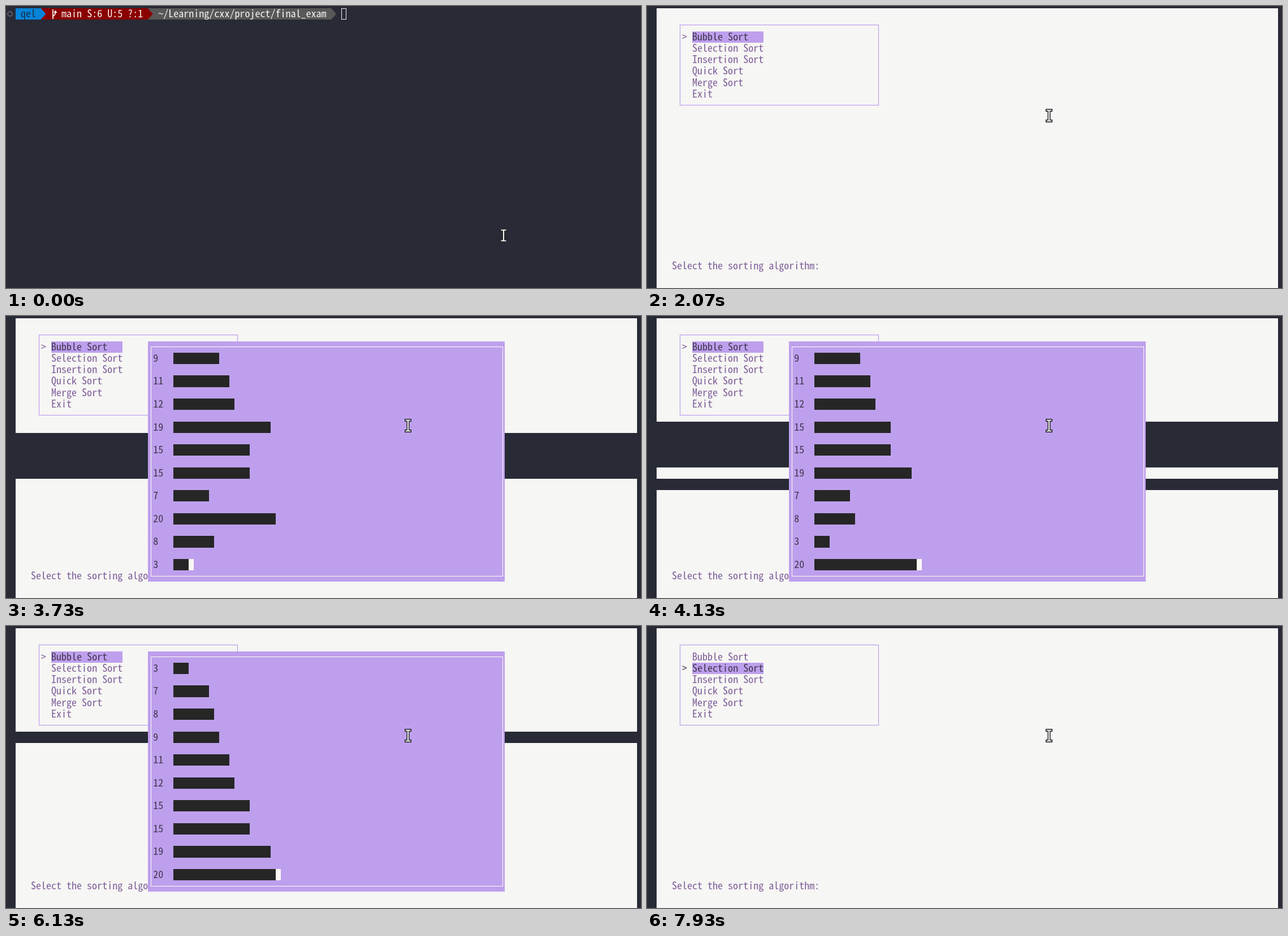
An HTML page with a canvas for the animation above (8 s loop, 1123 by 499 pixels).

```html
<!DOCTYPE html>
<html lang="en">
<head>
<meta charset="utf-8">
<title>Terminal sort visualizer</title>
<style>
html, body { margin: 0; width: 100%; height: 100%; overflow: hidden; background: #282a36; }
canvas { display: block; }
</style>
</head>
<body>
<canvas id="stage" width="1123" height="499"></canvas>
<script>
const ctx = document.getElementById("stage").getContext("2d");
const LOOP = 8000, COL = 9.01, ROW = 20.28, COLS = 122;
const DARK = "#282a36", PAPER = "#f6f6f4", LILAC = "#be9fed", INK = "#262626",
      MENU = "#7d5d98", LABEL = "#41374f", LIGHT = "#f5f4f1";
const ALGORITHMS = ["Bubble Sort", "Selection Sort", "Insertion Sort", "Quick Sort", "Merge Sort", "Exit"];
const FAMILY = '"Noto Sans Mono CJK JP", "Noto Sans Mono CJK SC", "Noto Sans Mono", monospace';

const colX = c => 17 + c * COL;
const rowY = r => 4 + r * ROW;

// Font size at which one character fills one column
function gridFont() {
  ctx.font = `100px ${FAMILY}`;
  return `${100 * COL / ctx.measureText("m").width}px ${FAMILY}`;
}

function box(x0, y0, x1, y1, color) {
  x0 = Math.round(x0); y0 = Math.round(y0);
  ctx.fillStyle = color;
  ctx.fillRect(x0, y0, Math.round(x1) - x0, Math.round(y1) - y0);
}

function cells(c, r, w, h, color) {
  box(colX(c), rowY(r), colX(c + w), rowY(r + h), color);
}

function text(str, c, r, color) {
  ctx.fillStyle = color;
  ctx.fillText(str, colX(c), rowY(r) + 16);
}

// Line border through the centres of the edge cells
function frame(c0, r0, c1, r1, color) {
  const x = Math.round(colX(c0 + 0.5)), y = Math.round(rowY(r0 + 0.5));
  ctx.strokeStyle = color;
  ctx.lineWidth = 1.2;
  ctx.strokeRect(x + 0.5, y - 0.5, Math.round((c1 - c0) * COL), Math.round((r1 - r0) * ROW));
}

// Every array state of the bubble sort, one per swap
function sortStates(list) {
  const a = list.slice(), states = [list];
  for (let end = a.length - 1; end > 0; end--)
    for (let i = 0; i < end; i++)
      if (a[i] > a[i + 1]) {
        [a[i], a[i + 1]] = [a[i + 1], a[i]];
        states.push(a.slice());
      }
  return states;
}

// Terminal scroll optimisation: [swap, first row, last row, shift].
// Rows opened by a downward scroll keep the default background.
const SCROLLS = [
  [3, 10, 16, 2], [4, 10, 16, 2], [8, 9, 14, 2], [9, 9, 14, 2],
  [13, 9, 14, -2], [14, 12, 16, -2], [17, 10, 14, -2]
];

function bareRows(step) {
  let bare = new Set();
  for (const [at, top, bottom, shift] of SCROLLS) {
    if (at > step) break;
    const next = new Set([...bare].filter(r => r < top || r > bottom));
    for (let r = top; r <= bottom; r++) {
      const from = r - shift;
      if (from < top || (from <= bottom && bare.has(from))) next.add(r);
    }
    bare = next;
  }
  return bare;
}

const states = sortStates([11, 9, 12, 20, 19, 15, 15, 7, 8, 3]);
const bareByStep = states.map((_, i) => bareRows(i));

function segment(c, w, color, next) {
  cells(c, 0, w + 1, 1, color);
  const x = colX(c + w);
  box(x, 4, x + COL, 24, next);
  ctx.fillStyle = color;
  ctx.beginPath();
  ctx.moveTo(x - 0.5, 4);
  ctx.lineTo(x + 8.5, 14);
  ctx.lineTo(x - 0.5, 24);
  ctx.fill();
}

function branchIcon() {
  ctx.strokeStyle = LIGHT;
  ctx.lineWidth = 1.8;
  ctx.beginPath();
  ctx.moveTo(83, 6);
  ctx.lineTo(83, 23);
  ctx.moveTo(83, 18);
  ctx.quadraticCurveTo(87.5, 16, 87.5, 10);
  ctx.moveTo(85.3, 12);
  ctx.lineTo(87.5, 9);
  ctx.lineTo(89.5, 12);
  ctx.stroke();
}

function drawShell(t) {
  ctx.strokeStyle = "#70737c";
  ctx.lineWidth = 1.5;
  ctx.beginPath();
  ctx.arc(7, 14, 4, 0, Math.PI * 2);
  ctx.stroke();

  segment(0, 5, "#0684d8", "#8a0000");
  segment(6, 20, "#8a0000", "#585858");
  segment(27, 35, "#585858", DARK);
  text("qel", 1, 0, "#17304c");
  branchIcon();
  text("main S:6 U:5 ?:1", 9, 0, LIGHT);
  text("~/Learning/cxx/project/final_exam", 28, 0, LIGHT);

  if (t < 1470) {
    ctx.strokeStyle = ctx.fillStyle = LIGHT;
    ctx.lineWidth = 1;
    ctx.strokeRect(593.5, 4.5, 8, 19);
    if (t >= 870) ctx.fillRect(594, 5, 7, 18);
  } else {
    text("sudo make run", 64, 0, LIGHT);
    if (t < 2000) cells(77, 0, 1, 1, LIGHT);
  }
  if (t >= 2000) {
    text("install -m 644 lib/libdata_structures.a lib/libsorting.a lib/libutils.a /usr/local/lib/", 0, 1, LIGHT);
    text("install -m 755 lib/libvisualization.so /usr/local/lib/", 0, 2, LIGHT);
    text("ldconfig", 0, 3, LIGHT);
    cells(0, 4, 1, 1, LIGHT);
  }
}

function drawMenu(selected) {
  box(17, 4, colX(COLS), 499, PAPER);
  frame(4, 1, 43, 8, LILAC);
  cells(7, 2 + selected, 14, 1, LILAC);
  text(">", 5, 2 + selected, selected ? LABEL : MENU);
  ALGORITHMS.forEach((name, i) => text(name, 7, 2 + i, i === selected ? LABEL : MENU));
  text("Select the sorting algorithm:", 3, 22, MENU);
}

function drawSort(step) {
  bareByStep[step].forEach(r => cells(0, r, COLS, 1, DARK));
  cells(26, 2, 70, 21, LILAC);
  frame(26, 2, 95, 22, LIGHT);
  states[step].forEach((value, i) => {
    const r = 3 + 2 * i;
    text(value, 27, r, LABEL);
    cells(31, r, value, 1, INK);
  });
  cells(31 + states[step][9], 21, 1, 1, "#fbf8f3");
}

function drawPointer(t) {
  const p = Math.min(6, Math.floor((t + 4) / (200 / 3))) / 6;
  const e = p * p * (3 - 2 * p);
  const x = 880 - 169 * e, y = 406 - 212 * e;
  ctx.beginPath();
  for (const end of [y - 9.5, y + 9.5]) {
    ctx.moveTo(x - 3.5, end);
    ctx.lineTo(x + 3.5, end);
  }
  ctx.moveTo(x, y - 9);
  ctx.lineTo(x, y + 9);
  ctx.lineCap = "square";
  ctx.strokeStyle = "#1d1d20";
  ctx.lineWidth = 5;
  ctx.stroke();
  ctx.strokeStyle = "#f2f2f2";
  ctx.lineWidth = 2.2;
  ctx.stroke();
  ctx.lineCap = "butt";
}

// Swaps land alternately 130 and 70 ms apart
function sortStep(t) {
  const d = t - 3200, pair = Math.floor(d / 200);
  return Math.min(states.length - 1, 2 * pair + (d % 200 >= 130 ? 1 : 0));
}

const font = gridFont();

function draw(t) {
  ctx.fillStyle = DARK;
  ctx.fillRect(0, 0, 1123, 499);
  ctx.font = font;
  if (t < 2070) drawShell(t);
  else drawMenu(t < 7930 ? 0 : 1);
  if (t >= 3200 && t < 7200) drawSort(sortStep(t));
  drawPointer(t);
}

const start = performance.now();
function tick() {
  draw((performance.now() - start) % LOOP);
  requestAnimationFrame(tick);
}
tick();
</script>
</body>
</html>
```
